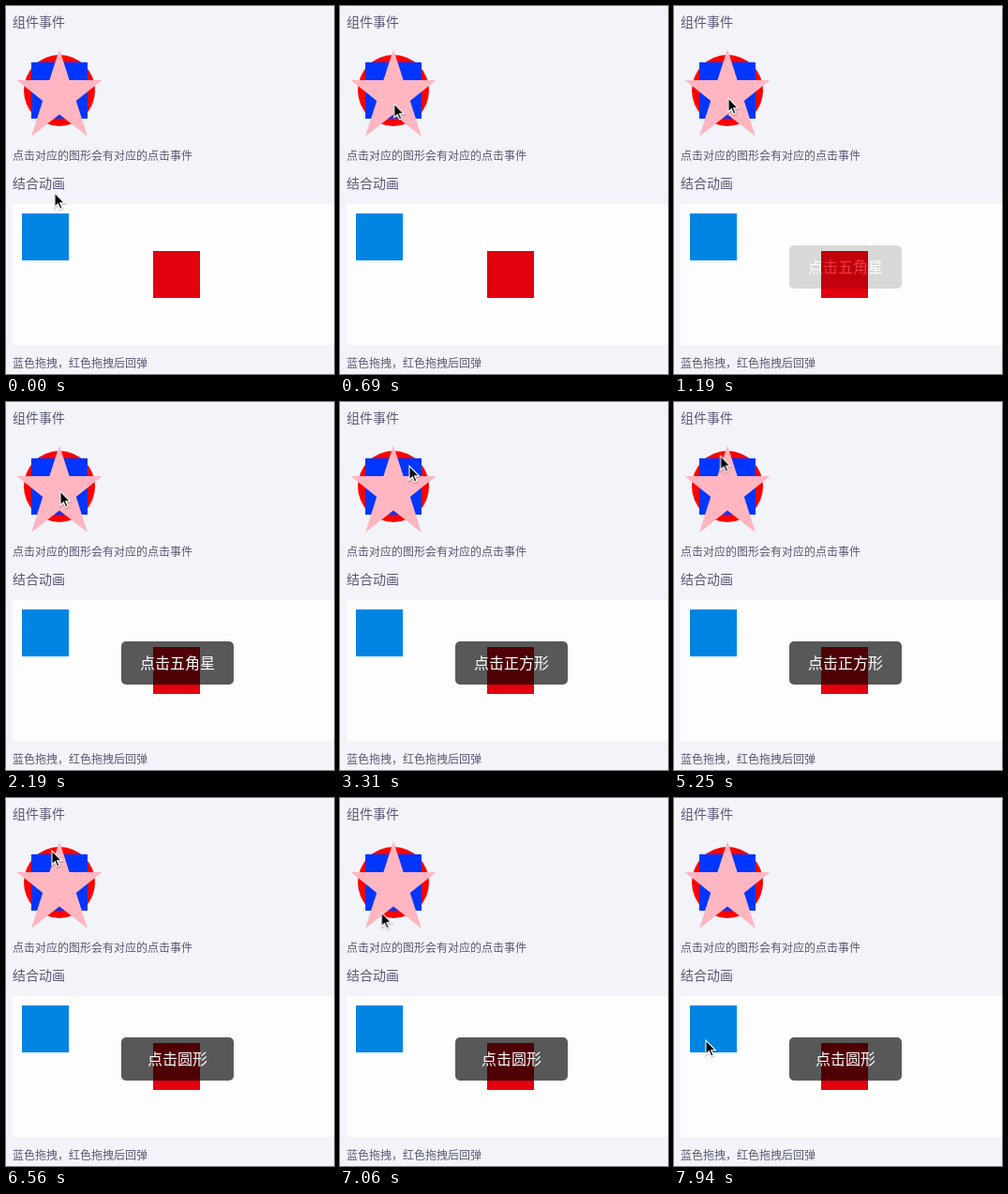
Write an HTML page that moves like this. It is 350 px wide and 392 px high and loops after 8000 ms.

```html
<!DOCTYPE html>
<html lang="zh-CN">
<head>
<meta charset="utf-8">
<style>
  html, body { margin: 0; width: 100%; height: 100%; overflow: hidden; background: #f3f4fa; }
  svg { display: block; width: 350px; height: 392px; }
  text { font-family: "Noto Sans CJK SC", "Noto Sans CJK", sans-serif; fill: #5a5975; }
  .title { font-size: 14px; }
  .note { font-size: 12px; }
  .toast text { font-size: 16px; fill: #fff; text-anchor: middle; }

  .toast, .toast text, .cursor { animation: 8s linear infinite; }
  .toast { animation-name: fade-in; }
  .toast .star { animation-name: star-label; }
  .toast .square { animation-name: square-label; }
  .toast .circle { animation-name: circle-label; }
  .cursor { animation-name: travel; animation-timing-function: ease-in-out; }

  @keyframes fade-in {
    0%, 14.1% { opacity: 0; }
    17.6%, 100% { opacity: 1; }
  }
  @keyframes star-label {
    0%, 37.49% { opacity: 1; }
    37.5%, 100% { opacity: 0; }
  }
  @keyframes square-label {
    0%, 37.49% { opacity: 0; }
    37.5%, 69.49% { opacity: 1; }
    69.5%, 100% { opacity: 0; }
  }
  @keyframes circle-label {
    0%, 69.49% { opacity: 0; }
    69.5%, 100% { opacity: 1; }
  }
  @keyframes travel {
    0%, .75% { transform: translate(51px, 198px); }
    10.1% { transform: translate(57px, 98px); }
    14.875% { transform: translate(57px, 97px); }
    21% { transform: translate(57px, 94px); }
    31% { transform: translate(57px, 94px); }
    36.5%, 42.5% { transform: translate(73px, 67px); }
    50.5%, 52% { transform: translate(50px, 59px); }
    58.6%, 64.1% { transform: translate(49px, 57px); }
    68%, 84.4% { transform: translate(48px, 55px); }
    94% { transform: translate(34px, 251px); }
    99%, 100% { transform: translate(33px, 257px); }
  }
</style>
</head>
<body>
<svg viewBox="0 0 350 392">
  <text class="title" x="7" y="22">组件事件</text>
  <circle cx="57" cy="90" r="38" fill="#f00"/>
  <path d="M27 60h60v60h-60z" fill="#0036ff"/>
  <path d="M57 46 67.6 79H102.5L74.8 101 87 139 57 115.5 27 139 39.2 101 11.5 79H46.4Z" fill="#ffb6c1"/>
  <text class="note" x="7" y="164">点击对应的图形会有对应的点击事件</text>

  <text class="title" x="7" y="194">结合动画</text>
  <path d="M7 211h343v150H7z" fill="#fdfdfd"/>
  <path d="M17 221h50v50h-50z" fill="#0085e3"/>
  <path d="M157 261h50v50h-50z" fill="#e3000f"/>
  <text class="note" x="7" y="385">蓝色拖拽，红色拖拽后回弹</text>

  <g class="toast">
    <rect x="123" y="255" width="120" height="46" rx="5" fill="#000" fill-opacity=".65"/>
    <text class="star" x="183" y="283.5">点击五角星</text>
    <text class="square" x="183" y="283.5">点击正方形</text>
    <text class="circle" x="183" y="283.5">点击圆形</text>
  </g>

  <g class="cursor">
    <path d="M1 1V16L4.4 12.8 6.7 18 9 17 6.7 11.8H11.4Z" transform="translate(.3 1)" fill="none" stroke="#000" stroke-opacity=".15" stroke-width="2.5"/>
    <path d="M1 1V16L4.4 12.8 6.7 18 9 17 6.7 11.8H11.4Z" fill="#000" stroke="#fff" stroke-width="1.1"/>
  </g>
</svg>
</body>
</html>
```
